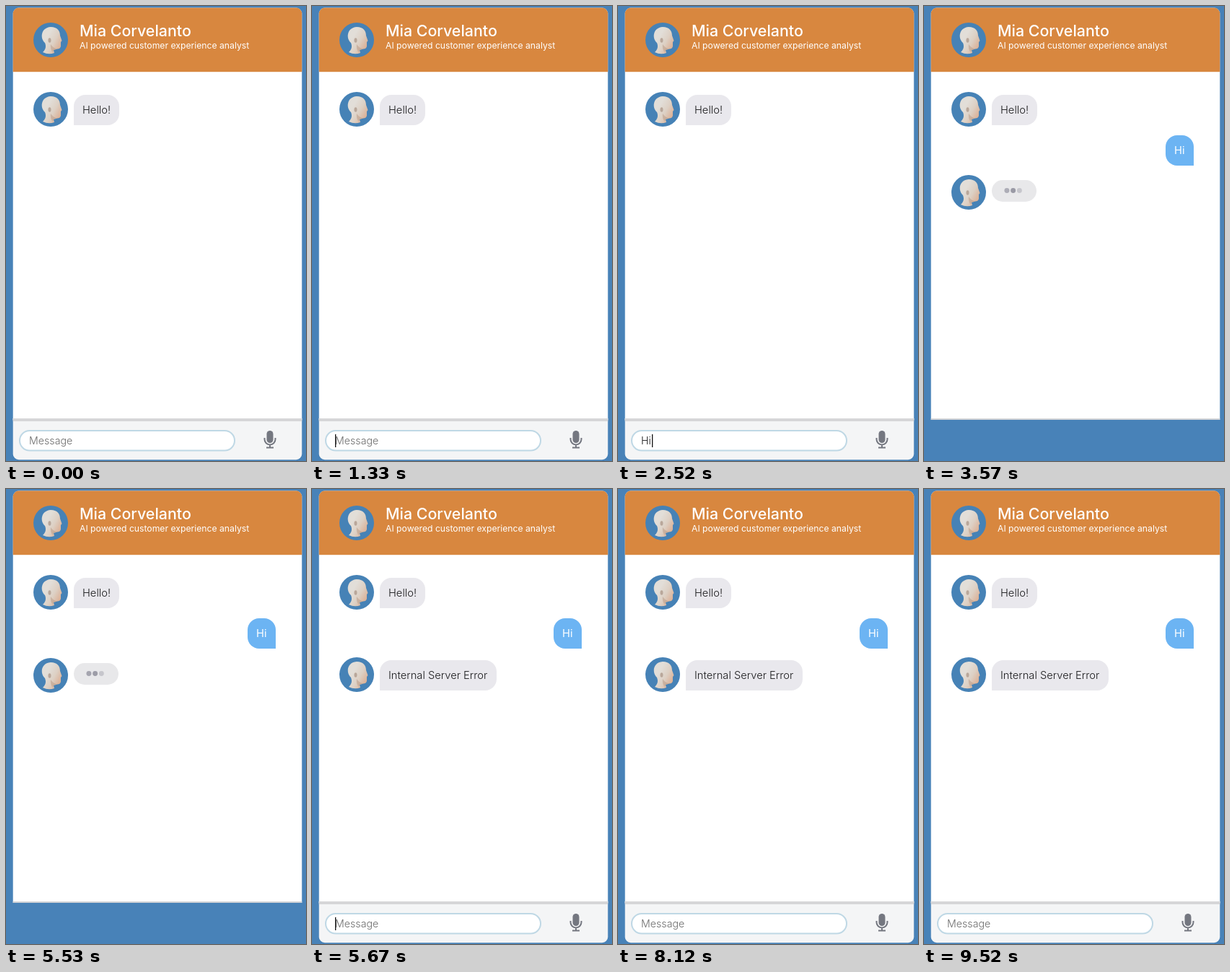
An HTML page for the animation above (9590 ms loop, 416 px wide and 630 px high).

```html
<!DOCTYPE html>
<html lang="en">
<head>
<meta charset="utf-8">
<title>Chat</title>
<style>
  html, body { margin: 0; width: 100%; height: 100%; overflow: hidden; background: #4882b8; }
  svg { display: block; width: 416px; height: 630px; }
  text { font: 300 14.7px Inter, "Open Sans", sans-serif; fill: #1c1c1e; }
  .title { font-size: 21.4px; font-weight: 500; fill: #fff; }
  .sub { font-size: 12.2px; font-weight: 400; fill: #fff; }
  .field { font-size: 14.2px; }
  .hint { fill: #6c6c6c; }
  .sent { fill: #fff; font-weight: 400; }
</style>
</head>
<body>
<svg viewBox="0 0 416 630">
  <defs>
    <clipPath id="panel"><rect x="9.7" y="2.6" width="400.6" height="625.6" rx="8"/></clipPath>
    <linearGradient id="skin" x1="0" y1="0" x2="1" y2=".75">
      <stop offset=".35" stop-color="#e2ded8"/>
      <stop offset=".65" stop-color="#ddd0c4"/>
      <stop offset="1" stop-color="#dbab8e"/>
    </linearGradient>
    <g id="avatar">
      <circle cx="24" cy="24" r="24" fill="#4682b6"/>
      <path fill="url(#skin)" d="M13 41C17 37 18 33 16 28C9 22 10 7 24 6C33 6 37 11 37 18L39.5 25L38 27V33Q37 36.5 33 36.5L28 38L29 42Q21 45 13 41Z"/>
      <path fill="#b99c88" opacity=".55" d="M24 30Q27 35 33 36.5L28 38L27 41Q23 37 24 30Z"/>
      <ellipse cx="22.5" cy="24.5" rx="2" ry="3.3" fill="#b9a79a"/>
    </g>
  </defs>

  <g clip-path="url(#panel)">
    <rect x="9" y="2" width="402" height="571" fill="#fff"/>
    <rect x="9" y="2" width="402" height="89.2" fill="#d8873f"/>
    <rect x="9" y="571" width="402" height="2" fill="#d3d4d7"/>
    <g id="footer">
      <rect x="9" y="571" width="402" height="58" fill="#f4f5f6"/>
      <rect x="9" y="571" width="402" height="4" fill="#d6d6d8"/>
      <rect x="19" y="588" width="298" height="27.5" rx="13.75" fill="#fff" stroke="#bfd8e5" stroke-width="2"/>
      <text id="hint" class="field hint" x="32" y="607">Message</text>
      <text id="typed" class="field" x="32" y="607"></text>
      <rect id="caret" y="593" width="1.3" height="18" fill="#111"/>
      <g fill="none" stroke="#747780" stroke-width="2">
        <rect x="361.5" y="588" width="9" height="17" rx="4.5" fill="#747780" stroke="none"/>
        <path d="M358.5 598V600a7.5 7.5 0 0 0 15 0V598M366 607.5V611.5M361 611.5H371"/>
      </g>
    </g>
  </g>

  <use href="#avatar" x="38" y="23"/>
  <text class="title" x="102" y="42">Mia Corvelanto</text>
  <text class="sub" x="102" y="59">AI powered customer experience analyst</text>

  <use href="#avatar" x="38" y="119"/>
  <path fill="#e9e8ed" d="M94 165V139a16 16 0 0 1 16-16H141a16 16 0 0 1 16 16V149a16 16 0 0 1-16 16Z"/>
  <text x="106" y="149">Hello!</text>

  <g id="sent">
    <path fill="#6cb4f3" d="M374 221H351a16 16 0 0 1-16-16V195a16 16 0 0 1 16-16H358a16 16 0 0 1 16 16Z"/>
    <text class="sent" x="347" y="205">Hi</text>
  </g>

  <g id="waiting">
    <use href="#avatar" x="38" y="234"/>
    <g id="bulge">
      <rect x="-29.5" y="-14.3" width="59" height="28.6" rx="14.3" fill="#e8e8ea"/>
      <g fill="#9494a0">
        <circle class="dot" cx="-9.6" cy="-.5" r="3.3"/>
        <circle class="dot" cx="-1.3" cy="-.5" r="3.3"/>
        <circle class="dot" cx="7" cy="-.5" r="3.3"/>
      </g>
    </g>
  </g>

  <g id="reply">
    <use href="#avatar" x="38" y="233"/>
    <path fill="#e9e8ed" d="M94 279V253a16 16 0 0 1 16-16H240a16 16 0 0 1 16 16V263a16 16 0 0 1-16 16Z"/>
    <text x="106" y="263">Internal Server Error</text>
  </g>
</svg>

<script>
const LOOP = 9590, FOCUS = 1050, KEY_H = 2240, KEY_I = 2380, SEND = 2590, REPLY = 5670, BLUR = 8120;
const BLINK = 490;
const $ = id => document.getElementById(id);
const dots = document.querySelectorAll(".dot");
const show = (id, on) => $(id).setAttribute("display", on ? "inline" : "none");

// CSS-style cubic-bezier timing, solved by bisection
function bezier(x1, y1, x2, y2) {
  const curve = (a, b, s) => 3 * a * s * (1 - s) ** 2 + 3 * b * s * s * (1 - s) + s ** 3;
  return x => {
    let lo = 0, hi = 1;
    for (let i = 0; i < 20; i++) {
      const mid = (lo + hi) / 2;
      if (curve(x1, x2, mid) < x) lo = mid; else hi = mid;
    }
    return curve(y1, y2, lo);
  };
}
const ease = bezier(.25, .1, .25, 1);
const easeOut = bezier(0, 0, .58, 1);

// Rises to 1 at mid-period, then falls back, easing each half
function pulse(ms, period, timing) {
  if (ms < 0) return 0;
  const p = ms % period / period * 2;
  return p < 1 ? timing(p) : 1 - timing(p - 1);
}

const blinkOn = ms => Math.floor(ms / BLINK) % 2 === 0;

function caretOn(t) {
  if (t >= FOCUS && t < KEY_H) return blinkOn(t - FOCUS);
  if (t >= KEY_H && t < SEND) return true;
  return t >= REPLY && t < BLUR && blinkOn(t - REPLY);
}

function draw(t) {
  const waiting = t >= SEND && t < REPLY;
  const typed = t < KEY_H || t >= SEND ? "" : t < KEY_I ? "H" : "Hi";
  show("sent", t >= SEND);
  show("waiting", waiting);
  show("reply", t >= REPLY);
  show("footer", !waiting);
  show("hint", !typed);
  show("caret", caretOn(t));
  $("typed").textContent = typed;
  $("caret").setAttribute("x", [32, 43, 47][typed.length]);

  const since = t - SEND;
  const scale = 1 + .05 * pulse(since, 2000, easeOut);
  $("bulge").setAttribute("transform", `translate(125 256) scale(${scale})`);
  dots.forEach((dot, i) => {
    const glow = pulse(since - (i + 1) * 1000 / 3, 1000, ease);
    dot.setAttribute("opacity", .4 + .6 * glow);
  });
}

const start = performance.now();
function tick() {
  draw((performance.now() - start) % LOOP);
  requestAnimationFrame(tick);
}
tick();
</script>
</body>
</html>
```
